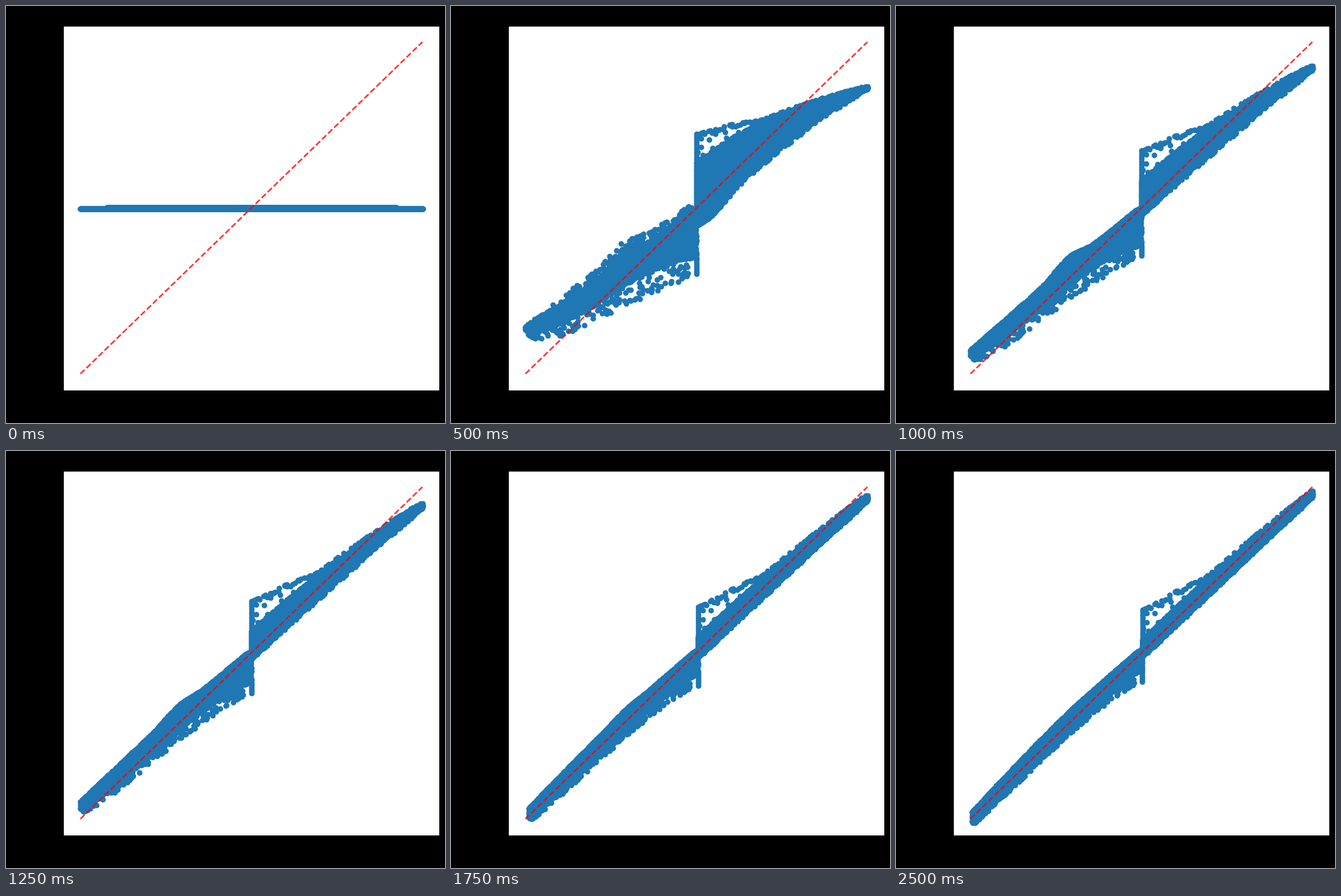
A matplotlib script for the animation above (2750 ms loop, 767 by 730 pixels).

```python
import numpy as np
import matplotlib.pyplot as plt
from matplotlib.animation import FuncAnimation
from matplotlib.patches import Rectangle

W, H, DPI = 767, 730, 100
FRAMES, INTERVAL = 11, 250
LEFT, JUMP, RIGHT = 130, 429, 728
HALF = JUMP - LEFT
BOTTOM, TOP = 644, 63
MIDDLE = 355
rng = np.random.default_rng(7)


def diagonal(x):
    return BOTTOM + (TOP - BOTTOM) * (x - LEFT) / (RIGHT - LEFT)


def bump(s, centre, width):
    return np.exp(-((s - centre) / width) ** 2)


# Each shape gives four heights above the diagonal: top and low of the dense
# core, then peak and dip, the reach of the stray points. s runs from 0 to 1
# over each half of the cloud.
def early(s, right):
    low_right = -45 - 81 * s**3 - 58 * bump(s, 0.09, 0.12)
    top = np.where(right, 130 - 250 * s**1.3, 152 * (1 - s)**1.5)
    low = np.where(right, low_right, 147 - 231 * s**0.67)
    peak = np.where(right, 172 - 296 * s, 154 - 106 * s**2.2)
    dip = np.where(right, low_right, 147 - 300 * s**0.76)
    return np.array([top, low, peak, dip])


def spur(s, right):
    return right * 52 * np.clip(1 - s / 0.43, 0.1, 1)


def rising(s, right):
    top = np.where(right, 63 - 129 * s**1.5,
                   59 * (1 - s) + 22 * bump(s, 0.57, 0.1))
    low = np.where(right, -16 - 50 * s**2, 54 * (1 - s)**5 - 88 * s**3.5)
    dip = np.where(right, -16 - 52 * s**1.2, 50 * (1 - s)**12 - 103 * s**1.3)
    return np.array([top, low, top + spur(s, right), dip])


def final(s, right):
    top = np.where(right, 22 - 29 * s**2, 10 + 11 * np.sin(np.pi * s))
    low = np.where(right, -6 - 8 * s, -11 - 15 * s**8)
    dip = np.where(right, -9 - 7 * s, -15 - 33 * s**5)
    return np.array([top, low, top + spur(s, right), dip])


def heights(t, x):
    right = x >= JUMP
    s = np.clip((x - np.where(right, JUMP, LEFT)) / HALF, 0, 1)
    if t < 3:
        ease = 1 - ((3 - t) / 2) ** 2
        return early(s, right) * (1 - ease) + rising(s, right) * ease
    settle = 0.64 ** (t - 3)
    return final(s, right) + (rising(s, right) - final(s, right)) * settle


def spread(n, start, end):
    return rng.uniform(start, end, n)


# Core points are spread evenly over (x, u); both sides of the jump and the
# right lower edge get a clean line.
k = np.arange(8000)
core_x = np.concatenate([LEFT + (RIGHT - LEFT) * (k * 0.7548776662 % 1),
                         np.full(70, JUMP), np.linspace(JUMP, RIGHT, 300)])
core_u = np.concatenate([(k * 0.5698402910 + rng.normal(0, 0.01, 8000)) % 1,
                         np.linspace(0, 1, 70), np.ones(300)])

# Strays lie a share v of the way from the core to its outer reach.
up_x = np.concatenate([spread(170, LEFT, JUMP - 8), spread(45, JUMP, RIGHT),
                       spread(70, JUMP, RIGHT), np.full(12, JUMP)])
up_v = np.concatenate([rng.random(215), 1 - 0.3 * rng.random(70)**2,
                       np.linspace(0, 1, 12)])
down_x = np.concatenate([LEFT + HALF * rng.random(170)**1.2,
                         spread(120, JUMP + 6, RIGHT),
                         np.full(8, JUMP - 0.1)])
down_v = np.concatenate([rng.random(170)**1.3, rng.random(120),
                         np.linspace(0, 1, 8)])
all_x = np.concatenate([core_x, up_x, down_x])


def flat_line():
    middle = np.abs(all_x - JUMP) < 253
    lift = 1.8 * (np.arange(len(all_x)) % 2)
    return np.column_stack([all_x, MIDDLE - lift * middle])


def cloud(t):
    if t == 0:
        return flat_line()
    top, low, _, _ = heights(t, core_x)
    core = top + (low - top) * core_u
    top, _, peak, _ = heights(t, up_x)
    up = top + (peak - top) * up_v
    _, low, _, dip = heights(t, down_x)
    down = low + (dip - low) * down_v
    y = diagonal(all_x) - np.concatenate([core, up, down])
    # The left end drifts as the horizontal scale changes.
    drift = np.interp(t, [5, 7, 9, 10], [0, 6, 6, 3])
    x = all_x + drift * (RIGHT - all_x) / (RIGHT - LEFT)
    return np.column_stack([x, y])


fig = plt.figure(figsize=(W / DPI, H / DPI), dpi=DPI, facecolor="black")
ax = fig.add_axes([0, 0, 1, 1])
ax.set_xlim(0, W)
ax.set_ylim(H, 0)
ax.axis("off")
ax.add_patch(Rectangle((101, 36), 656, 637, facecolor="white",
                       edgecolor="none", zorder=0))
dots = ax.scatter(all_x, np.full(len(all_x), MIDDLE), s=36, color="#1f77b4",
                  zorder=1)
ax.plot([LEFT, RIGHT - 0.5], [BOTTOM, TOP], "r--", lw=2, alpha=0.8, zorder=2)


def draw(i):
    dots.set_offsets(cloud(i))
    return dots,


anim = FuncAnimation(fig, draw, frames=FRAMES, interval=INTERVAL,
                     repeat=True, repeat_delay=0)
plt.show()
```
